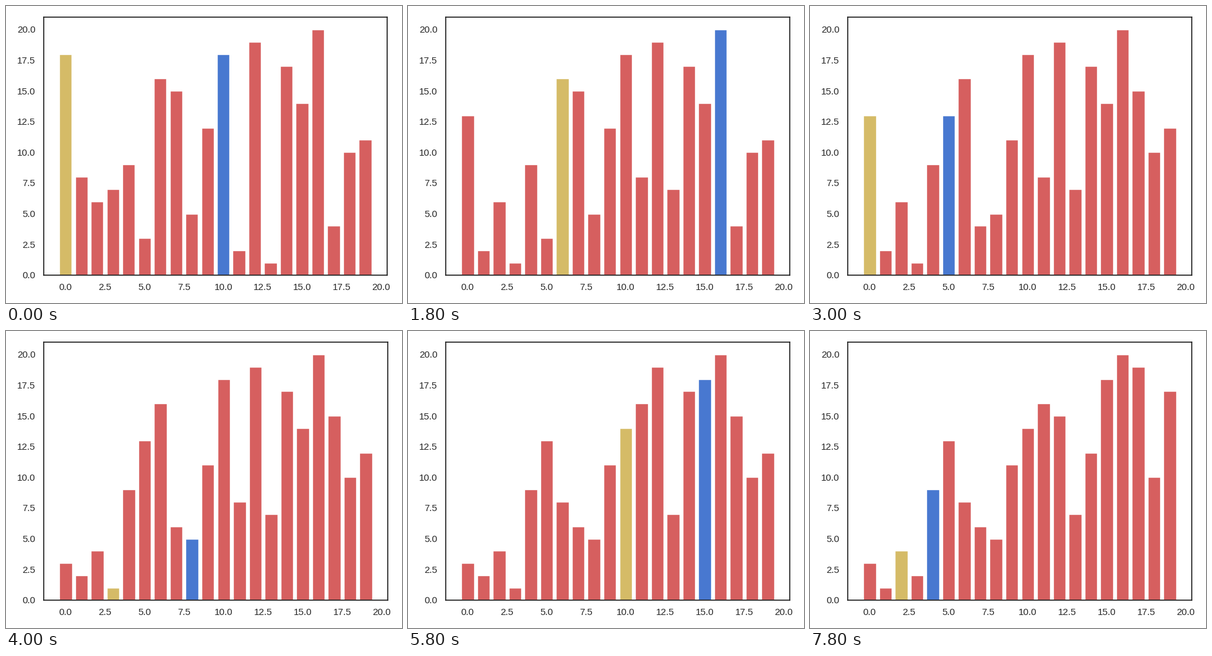
Recreate the animation shown at these times as a matplotlib script. Size 640 by 480 pixels, loop 8000 ms.

```python
import matplotlib.pyplot as plt
from matplotlib.animation import FuncAnimation

INK, RED, BLUE, YELLOW = "#262626", "#d65f5f", "#4878d0", "#d5bb67"
FRAMES, STEP_MS = 40, 200

plt.rcParams.update({
    "font.family": "Liberation Sans",
    "font.size": 12,
    "axes.edgecolor": INK,
    "axes.linewidth": 1.25,
    "axes.axisbelow": True,
    "patch.linewidth": 1,
    "patch.edgecolor": "white",
    "patch.force_edgecolor": True,
})
for axis, side in (("xtick", "bottom"), ("ytick", "left")):
    plt.rcParams.update({
        f"{axis}.{side}": False,
        f"{axis}.major.size": 6,
        f"{axis}.labelsize": 11,
        f"{axis}.labelcolor": INK,
    })


def shell_sort(values):
    """Yield (values, low, high) after every shift and every insertion."""
    a = list(values)
    gap = len(a) // 2
    while gap:
        for i in range(gap, len(a)):
            held, j = a[i], i
            while j >= gap and a[j - gap] > held:
                a[j] = a[j - gap]
                yield a[:], j - gap, j
                j -= gap
            a[j] = held
            yield a[:], i - gap, i
        gap //= 2


start = [18, 8, 6, 7, 9, 3, 16, 15, 5, 12, 13, 2, 19, 1, 17, 14, 20, 4, 10, 11]
steps = list(shell_sort(start))[:FRAMES]

fig, ax = plt.subplots(figsize=(6.4, 4.8), dpi=100)
bars = ax.bar(range(len(start)), start, color=RED)

# The margins settle on the second layout pass.
fig.tight_layout()
first_box = ax.get_position().frozen()
fig.tight_layout()
settled_box = ax.get_position().frozen()


def draw(k):
    values, low, high = steps[k]
    ax.set_position(settled_box if k else first_box)
    for i, (bar, value) in enumerate(zip(bars, values)):
        bar.set_height(value)
        bar.set_facecolor(YELLOW if i == low else BLUE if i == high else RED)
    return list(bars)


anim = FuncAnimation(fig, draw, frames=FRAMES, init_func=lambda: draw(0),
                     interval=STEP_MS, repeat=True, repeat_delay=0)
plt.show()
```
